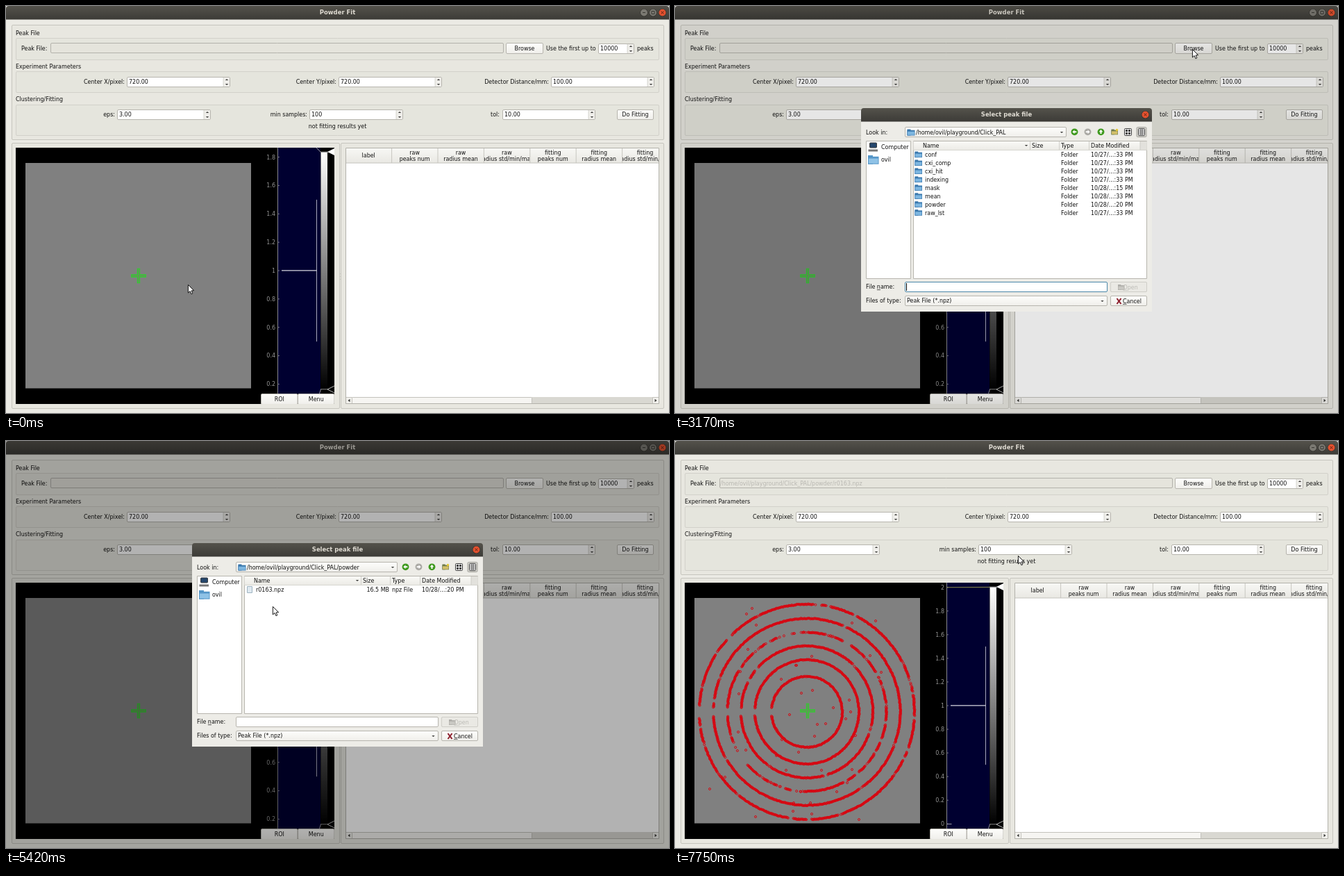
Recreate the animation shown at these times as an HTML page with a canvas. Size 955x586 px, loop 8 s.

```html
<!DOCTYPE html>
<html lang="en">
<head>
<meta charset="utf-8">
<title>Powder Fit</title>
<style>
html, body { margin: 0; width: 100%; height: 100%; overflow: hidden; background: #ebeae4; }
canvas { display: block; }
</style>
</head>
<body>
<canvas id="stage" width="955" height="586"></canvas>
<script>
const ctx = document.getElementById('stage').getContext('2d');
const LOOP = 8000, TICK = 1000 / 12, S = 955 / 1920;
const UI = '16px "DejaVu Sans", sans-serif';
const BOLD = 'bold 17px "DejaVu Sans", sans-serif';
const BODY = '#ebeae4', EDGE = '#b7b5ae', INK = '#111', BLUE = '#308cc6';
const HOME = '/home/ovil/playground/Click_PAL';

// Ticks at which the state changes
const OPEN = 35, DIMMED = 44, PICK_DIR = 57, ENTER = 64, PICK_FILE = 74, ACCEPT = 78;

// Pointer path: tick, x, y
const PATH = [
  [13, 262, 401], [20, 457, 190], [23, 457, 190], [28, 728, 72], [29, 728, 72],
  [31, 753, 59], [32, 745, 62], [40, 745, 62], [44, 676, 144], [47, 532, 232],
  [48, 532, 232], [50, 430, 285], [51, 430, 285], [52, 417, 287], [53, 403, 286],
  [54, 403, 286], [55, 383, 286], [63, 383, 286], [65, 384, 238], [66, 384, 238],
  [71, 372, 215], [88, 372, 215], [89, 388, 206], [90, 388, 206], [93, 494, 165]
];

const clamp = v => Math.max(0, Math.min(1, v));

function pointerAt(k) {
  if (k <= PATH[0][0]) return PATH[0].slice(1);
  for (let i = 1; i < PATH.length; i++) {
    const [t0, x0, y0] = PATH[i - 1], [t1, x1, y1] = PATH[i];
    if (k > t1) continue;
    const p = (k - t0) / (t1 - t0), e = p * p * (3 - 2 * p);
    return [x0 + (x1 - x0) * e, y0 + (y1 - y0) * e];
  }
  return PATH[PATH.length - 1].slice(1);
}

// Text is centred vertically on y; "&" underlines the next letter.
function text(s, x, y, align = 'left', color = INK, font = UI) {
  const mark = s.indexOf('&');
  if (mark >= 0) s = s.replace('&', '');
  ctx.save();
  ctx.translate(x, y + 2.9);
  ctx.scale(S, S);
  ctx.font = font;
  ctx.textAlign = align;
  ctx.fillStyle = color;
  ctx.fillText(s, 0, 0);
  if (mark >= 0) {
    const from = ctx.measureText(s.slice(0, mark)).width;
    ctx.fillRect(from, 2, ctx.measureText(s[mark]).width, 1.4);
  }
  ctx.restore();
}

function rect(x, y, w, h, fill) {
  ctx.fillStyle = fill;
  ctx.fillRect(x, y, w, h);
}

function box(x, y, w, h, fill, edge = EDGE, r = 1.5) {
  ctx.beginPath();
  ctx.roundRect(x + .5, y + .5, w - 1, h - 1, r);
  if (fill) { ctx.fillStyle = fill; ctx.fill(); }
  ctx.strokeStyle = edge;
  ctx.lineWidth = 1;
  ctx.stroke();
}

function poly(points, fill, stroke, width = 1) {
  ctx.beginPath();
  points.forEach(([x, y]) => ctx.lineTo(x, y));
  ctx.closePath();
  if (fill) { ctx.fillStyle = fill; ctx.fill(); }
  if (stroke) { ctx.strokeStyle = stroke; ctx.lineWidth = width; ctx.stroke(); }
}

function line(x0, y0, x1, y1, color, width = 1) {
  ctx.beginPath();
  ctx.moveTo(x0, y0);
  ctx.lineTo(x1, y1);
  ctx.strokeStyle = color;
  ctx.lineWidth = width;
  ctx.stroke();
}

function disc(x, y, r, fill) {
  ctx.beginPath();
  ctx.arc(x, y, r, 0, 7);
  ctx.fillStyle = fill;
  ctx.fill();
}

function shade(y0, y1, top, bottom) {
  const g = ctx.createLinearGradient(0, y0, 0, y1);
  g.addColorStop(0, top);
  g.addColorStop(1, bottom);
  return g;
}

// Small triangle, dir -1 points up, 1 points down
function arrow(x, y, dir, size = 2.2) {
  poly([[x - size, y - dir * size / 2], [x + size, y - dir * size / 2], [x, y + dir * size / 2]], '#3c3c3a');
}

function button(x, y, w, h, label, edge = EDGE) {
  box(x, y, w, h, shade(y, y + h, '#fefefc', '#efeeea'), edge);
  text(label, x + w / 2, y + h / 2, 'center');
}

function spin(x, y, w, value) {
  box(x, y, w, 15, '#fff');
  rect(x + w - 10, y + 1, 9, 13, '#efeeea');
  line(x + w - 10, y + 1, x + w - 10, y + 14, '#cfcdc7', .8);
  arrow(x + w - 5, y + 4, -1);
  arrow(x + w - 5, y + 11, 1);
  text(value, x + 3, y + 7.5);
}

function closeButton(x, y) {
  disc(x, y, 5.6, '#33322e');
  disc(x, y, 5, '#e2512f');
  line(x - 1.8, y - 1.8, x + 1.8, y + 1.8, '#5b2012');
  line(x + 1.8, y - 1.8, x - 1.8, y + 1.8, '#5b2012');
}

function titleBar(x, y, w, title) {
  ctx.beginPath();
  ctx.roundRect(x, y, w, 19.5, [4, 4, 0, 0]);
  ctx.fillStyle = shade(y, y + 19.5, '#54524b', '#3c3b37');
  ctx.fill();
  text(title, x + w / 2, y + 9.5, 'center', '#dfdbd2', BOLD);
  closeButton(x + w - 9.5, y + 9.5);
}

function form(loaded) {
  box(8, 27, 940, 166, '#e8e7e0', '#c6c5be');
  [[46, 32], [94, 31], [142, 45]].forEach(([y, h]) => box(14, y, 927, h, '#e5e5dd', '#d2d1ca'));
  text('Peak File', 14, 39);
  text('Experiment Parameters', 14, 87);
  text('Clustering/Fitting', 14, 134.5);

  text('Peak File:', 22, 61.5);
  box(64, 53, 653, 15, '#e5e4dc', '#b3b2ab');
  if (loaded) text(HOME + '/powder/r0163.npz', 65, 61, 'left', '#b9b8b2');
  button(720, 53, 54, 16, 'Browse');
  text('Use the first up to', 778, 61.5);
  spin(853, 54, 52, '10000');
  text('peaks', 909, 61.5);

  text('Center X/pixel:', 171, 109, 'right');
  spin(174, 102, 149, '720.00');
  text('Center Y/pixel:', 476, 109, 'right');
  spin(479, 102, 149, '720.00');
  text('Detector Distance/mm:', 782, 109, 'right');
  spin(785, 102, 149, '100.00');

  text('eps:', 157, 156.5, 'right');
  spin(160, 149, 135, '3.00');
  text('min samples:', 434, 156.5, 'right');
  spin(437, 149, 135, '100');
  text('tol:', 711, 156.5, 'right');
  spin(715, 149, 134, '10.00');
  button(880, 149, 53, 15, 'Do Fitting');
  text('not fitting results yet', 477.5, 173.5, 'center');
}

function seeded(seed) {
  return () => (seed = (seed * 16807) % 2147483647) / 2147483647;
}

// Radius, half gap at the left, share of thinned stretches
const RINGS = [[51, 5, 0], [75, 5, .02], [95, 5, .06], [114.5, 6, .38], [134.5, 6, .06], [155, 9, .16]];
const STRAYS = [
  111, 241, 103, 249, 255, 262, 289, 259, 117, 265, 105, 300, 146, 305, 197, 310, 281, 309,
  174, 323, 175, 323, 94, 332, 297, 333, 153, 343, 198, 359, 182, 363, 251, 373, 92, 364,
  228, 384, 253, 390, 165, 394, 217, 407, 205, 408, 201, 425, 246, 400, 91, 419, 154, 430,
  178, 448, 260, 424, 102, 445, 238, 448, 146, 453, 255, 473, 211, 474, 160, 474, 119, 480,
  248, 492, 72, 484, 50, 501, 181, 505, 233, 505, 171, 521, 195, 521, 170, 533, 197, 537,
  116, 541, 265, 545
];

function peaks() {
  const rand = seeded(4711);
  ctx.strokeStyle = '#dd000c';
  ctx.lineWidth = .9;
  const mark = (x, y) => {
    ctx.beginPath();
    ctx.arc(x, y, 1.5, 0, 7);
    ctx.stroke();
  };
  for (const [r, gap, thin] of RINGS) {
    const n = Math.round(2 * Math.PI * r / 1.1);
    let dense = true;
    for (let i = 0; i < n; i++) {
      if (i % 6 === 0) dense = rand() >= thin;
      const a = i / n * 2 * Math.PI, d = r + (rand() - .5) * 1.2, skip = rand();
      const x = d * Math.cos(a), y = d * Math.sin(a);
      if ((x < 0 && Math.abs(y) < gap) || (!dense && skip > .2)) continue;
      mark(190 + x, 390 + y);
    }
  }
  for (let i = 0; i < STRAYS.length; i += 2) mark(STRAYS[i], STRAYS[i + 1]);
}

function cross(x, y) {
  const a = 10.3, b = 1.6;
  const pts = [[-b, -a], [b, -a], [b, -b], [a, -b], [a, b], [b, b], [b, a], [-b, a], [-b, b], [-a, b], [-a, -b], [-b, -b]];
  poly(pts.map(([u, v]) => [x + u, y + v]), '#5f9a55', '#2fd02f', 1.1);
}

function plot(loaded, marked, hover) {
  box(8, 197, 473, 383, '#e8e7e0', '#c6c5be');
  ctx.save();
  ctx.beginPath();
  ctx.rect(14, 204, 459, 369);
  ctx.clip();
  rect(14, 204, 459, 369, '#000');
  rect(28, 226, 325, 324.5, '#808080');
  if (marked) peaks();
  cross(191, 388.5);

  rect(391, 204, 62, 354, hover ? '#000064' : '#000030');
  line(391.5, 204, 391.5, 558, '#8a8a8e');
  const step = loaded ? 34.05 : 40.85;
  for (let i = 0; i <= 10; i++) {
    const y = 381 + (5 - i) * step;
    if (y < 206 || y > 556) continue;
    text(String(+(i * .2).toFixed(1)), 388, y, 'right', '#969696');
    line(391, y, 394, y, '#8a8a8e', .8);
  }
  line(447.5, 381 - 2.5 * step, 447.5, 381 + 2.5 * step, '#a9a9bb');
  line(397, 380.8, 447.5, 380.8, '#d8d8e0', 1.3);
  if (loaded) {
    line(392, 210.8, 453, 210.4, '#8f8f4c');
    line(392, 551.5, 398.5, 551.5, '#9a9aa8');
  } else {
    line(447, 204, 453.5, 210.5, '#9a9aa0');
  }
  line(453.5, 552, 451.5, 558, '#9a9aa0');
  rect(453.5, 210.5, 9.5, 341.5, shade(210, 552, '#fff', '#000'));
  line(453, 210.2, 464, 210.2, '#aaa');
  line(453, 551.8, 464, 551.8, '#888');
  poly([[463, 210], [474, 204.5], [474, 215.5]], '#fff');
  poly([[463, 552], [474, 546.5], [474, 557.5]], '#000', '#bbb');
  button(367, 558, 53.5, 16, 'ROI');
  button(420, 558, 53.5, 16, 'Menu');
  ctx.restore();
  [385, 389, 393].forEach(y => rect(481.4, y, 1, 1, '#bdbcb5'));
}

function table() {
  box(482, 197, 466, 383, '#e8e7e0', '#c6c5be');
  rect(489, 204, 452, 369, '#fff');
  rect(489, 204, 452, 22, shade(204, 226, '#f8f8f5', '#e9e8e3'));
  const heads = ['label', 'raw|peaks num', 'raw|radius mean', 'raw|radius std/min/max',
    'fitting|peaks num', 'fitting|radius mean', 'fitting|radius std/min/max'];
  heads.forEach((head, i) => {
    const x = 489 + i * 66.4, lines = head.split('|');
    ctx.save();
    ctx.beginPath();
    ctx.rect(x + .5, 204, Math.min(65.5, 940.5 - x), 22);
    ctx.clip();
    lines.forEach((s, j) => text(s, x + 33.2, lines.length > 1 ? 211 + j * 9 : 215.5, 'center'));
    ctx.restore();
    if (i) line(x + .2, 205, x + .2, 226, '#c3c2bc', .9);
  });
  line(489, 226, 941, 226, '#c3c2bc');
  rect(489, 563, 452, 10, '#d9d8d2');
  box(489, 563, 10, 10, '#f2f1ed', '#c3c2bc', 0);
  box(498, 563, 260, 10, '#f6f5f2', '#c3c2bc', 1);
  box(931, 563, 10, 10, '#f2f1ed', '#c3c2bc', 0);
  poly([[492.5, 568], [495.5, 565.8], [495.5, 570.2]], '#3c3c3a');
  poly([[937.5, 568], [934.5, 565.8], [934.5, 570.2]], '#3c3c3a');
  box(489, 204, 452, 369, null, '#b3b2ab', 0);
}

function mainWindow(loaded, marked, hover) {
  rect(0, 0, 955, 586, BODY);
  titleBar(0, 0, 955, 'Powder Fit');
  [919, 932].forEach(x => {
    disc(x, 9.5, 5.6, '#33322e');
    disc(x, 9.5, 5, '#7b7972');
  });
  line(917, 9.5, 921, 9.5, '#3a3934');
  box(929.5, 7, 5, 5, null, '#3a3934', 0);
  form(loaded);
  plot(loaded, marked, hover);
  table();
}

function folder(x, y, w, front = '#7db6e0', back = '#3a78ad') {
  const h = w * .82;
  rect(x, y, w * .45, h, back);
  rect(x, y + h * .14, w, h * .86, back);
  rect(x + w * .06, y + h * .36, w * .88, h * .56, front);
}

function toolIcons() {
  [[575.5, '#3f9a1f', 0], [594.5, '#aaa9a4', Math.PI], [613.5, '#3f9a1f', Math.PI / 2]].forEach(([x, color, turn]) => {
    disc(x, 181.3, 4.9, color);
    ctx.save();
    ctx.translate(x, 181.3);
    ctx.rotate(turn);
    poly([[-3.2, 0], [0, -2.8], [0, -1], [2.8, -1], [2.8, 1], [0, 1], [0, 2.8]], '#fff');
    ctx.restore();
  });
  folder(628.5, 177.5, 9.5, '#d3c06a', '#6e7a4a');
  disc(636.5, 178.5, 1.7, '#e8c930');
  box(647, 176, 11, 11, '#fff', '#333', 1);
  for (let i = 0; i < 4; i++) rect(649 + i % 2 * 4, 178 + (i >> 1) * 4, 3, 3, '#333');
  box(664.5, 174, 15, 15, '#d5d4ce', '#a3a29c');
  box(667, 176, 10, 11, '#fff', '#333', 1);
  for (let i = 0; i < 4; i++) rect(669, 178 + i * 2, 6, 1, '#333');
}

function row(y, [name, size, type, date], selected, isFile) {
  const color = selected ? '#fff' : INK;
  if (selected) rect(343.5, y - 6.2, 326.5, 12, BLUE);
  if (isFile) {
    box(347, y - 5, 8, 10, '#dfe9f0', '#9fb4c2', 0);
  } else {
    folder(345.5, y - 4.5, 10.5);
  }
  text(name, 360, y, 'left', color);
  text(size, 552, y, 'right', color);
  text(type, 556, y, 'left', color);
  text(date, 599, y, 'left', color);
}

const DIRS = ['conf', 'cxi_comp', 'cxi_hit', 'indexing', 'mask', 'mean', 'powder', 'raw_lst'];
const DATES = { mask: '10/28/…:15 PM', mean: '10/28/…:33 PM', powder: '10/28/…:20 PM' };

function dialog(k) {
  const inside = k >= ENTER, picked = k >= PICK_FILE;
  const focus = k < PICK_DIR, ready = picked || (k >= PICK_DIR && !inside);
  rect(268, 160, 419, 280, '#edece7');
  titleBar(268, 147, 419, 'Select peak file');
  closeButton(677.5, 156.5);

  text('Look in:', 275, 182);
  box(331, 174, 233, 15, shade(174, 189, '#fefefc', '#efeeea'));
  folder(334.5, 177.5, 11);
  text(HOME + (inside ? '' : ''), 347, 182, 'left', inside ? 'transparent' : INK);
  if (inside) text(HOME + '/powder', 347, 182);
  arrow(557, 182, 1);
  toolIcons();

  box(275, 194, 65, 199, '#fff', EDGE, 0);
  box(280, 196.5, 11, 8, '#24466c', '#3c3c3c', 1);
  rect(278.5, 206.5, 13.5, 3, '#777');
  text('Computer', 297, 203.5);
  folder(278, 215, 15.5, '#8fc2e6', '#5596c8');
  text('ovil', 297, 221);

  box(343, 194, 337, 199, '#fff', EDGE, 0);
  rect(343.5, 195, 336, 12.5, shade(195, 207, '#f9f9f6', '#ecebe6'));
  rect(670, 195, 9.5, 12.5, '#e2e1dc');
  line(343, 207.5, 680, 207.5, '#cfcec8', .8);
  [511.5, 553.5, 596.5, 670].forEach(x => line(x, 195, x, 207, '#c8c7c1', .8));
  [['Name', 357], ['Size', 514], ['Type', 556], ['Date Modified', 599]].forEach(([s, x]) => text(s, x, 201));
  arrow(506, 201, 1);
  if (inside) {
    row(214, ['r0163.npz', '16.5 MB', 'npz File', DATES.powder], picked, true);
  } else {
    DIRS.forEach((name, i) => row(214 + i * 11.95,
      [name, '', 'Folder', DATES[name] || '10/27/…:33 PM'], k >= PICK_DIR && name === 'powder'));
  }

  text('File &name:', 275, 404.5);
  box(331, 397, 292, 15, '#fff', focus ? '#4a87a8' : EDGE);
  if (focus && Math.floor((k - 38) / 7) % 2 === 0) line(333.5, 399, 333.5, 410, '#000');
  if (picked) text('r0163.npz', 333, 404.5);
  button(627, 397, 53, 15, '', ready ? '#5f93b5' : '#cfcec8');
  if (!ready) box(627, 397, 53, 15, '#eae9e4', '#cfcec8');
  if (ready) folder(638, 401, 9.5, '#e0bd5c', '#8a6f35');
  else folder(638, 401, 9.5, '#c9c8c3', '#b0afaa');
  text('&Open', 645.5, 405, 'left', ready ? INK : '#bcbbb6');

  text('Files of type:', 275, 424.5);
  box(331, 417, 292, 15, shade(417, 432, '#fefefc', '#efeeea'));
  text('Peak File (*.npz)', 334, 424.5);
  arrow(615.5, 425, 1);
  button(627, 417, 53, 15, '');
  line(636.5, 421, 642.5, 429, '#8d1f2d', 2);
  line(642.5, 421, 636.5, 429, '#8d1f2d', 2);
  text('&Cancel', 645, 425);
}

function pointer([x, y]) {
  const shape = [[0, 0], [0, 11.6], [2.7, 9.1], [4.5, 13.3], [6.4, 12.5], [4.7, 8.5], [8.2, 8.3]];
  poly(shape.map(([u, v]) => [x + .4 + u, y + .4 + v]), '#fff', '#000', .9);
}

function dimAt(k) {
  if (k < ACCEPT) return .3 * clamp((k - OPEN) / (DIMMED - OPEN));
  return [.3, .14, .05][k - ACCEPT] || 0;
}

// Vertical scale of the dialog while it opens and closes
function dialogScale(k) {
  if (k < OPEN) return 0;
  if (k >= ACCEPT) return [.98, .2][k - ACCEPT] || 0;
  const p = clamp((k - OPEN + .5) / 3);
  return p * (2 - p);
}

function draw(k) {
  const tip = pointerAt(k), [x, y] = tip, scale = dialogScale(k);
  const hover = !scale && x > 391 && x < 448 && y > 206 && y < 558;
  mainWindow(k >= ACCEPT, k > ACCEPT, hover);
  const dim = dimAt(k);
  if (dim) rect(0, 0, 955, 586, `rgba(0,0,0,${dim})`);
  if (scale) {
    ctx.save();
    ctx.translate(0, 293.5 * (1 - scale));
    ctx.scale(1, scale);
    dialog(k);
    ctx.restore();
  }
  pointer(tip);
}

let last = -1;
const start = performance.now();
function loop() {
  const t = (performance.now() - start) % LOOP;
  const k = Math.floor((t + 4) / TICK) % 96;
  if (k !== last) draw(last = k);
  requestAnimationFrame(loop);
}
draw(0);
requestAnimationFrame(loop);
</script>
</body>
</html>
```
